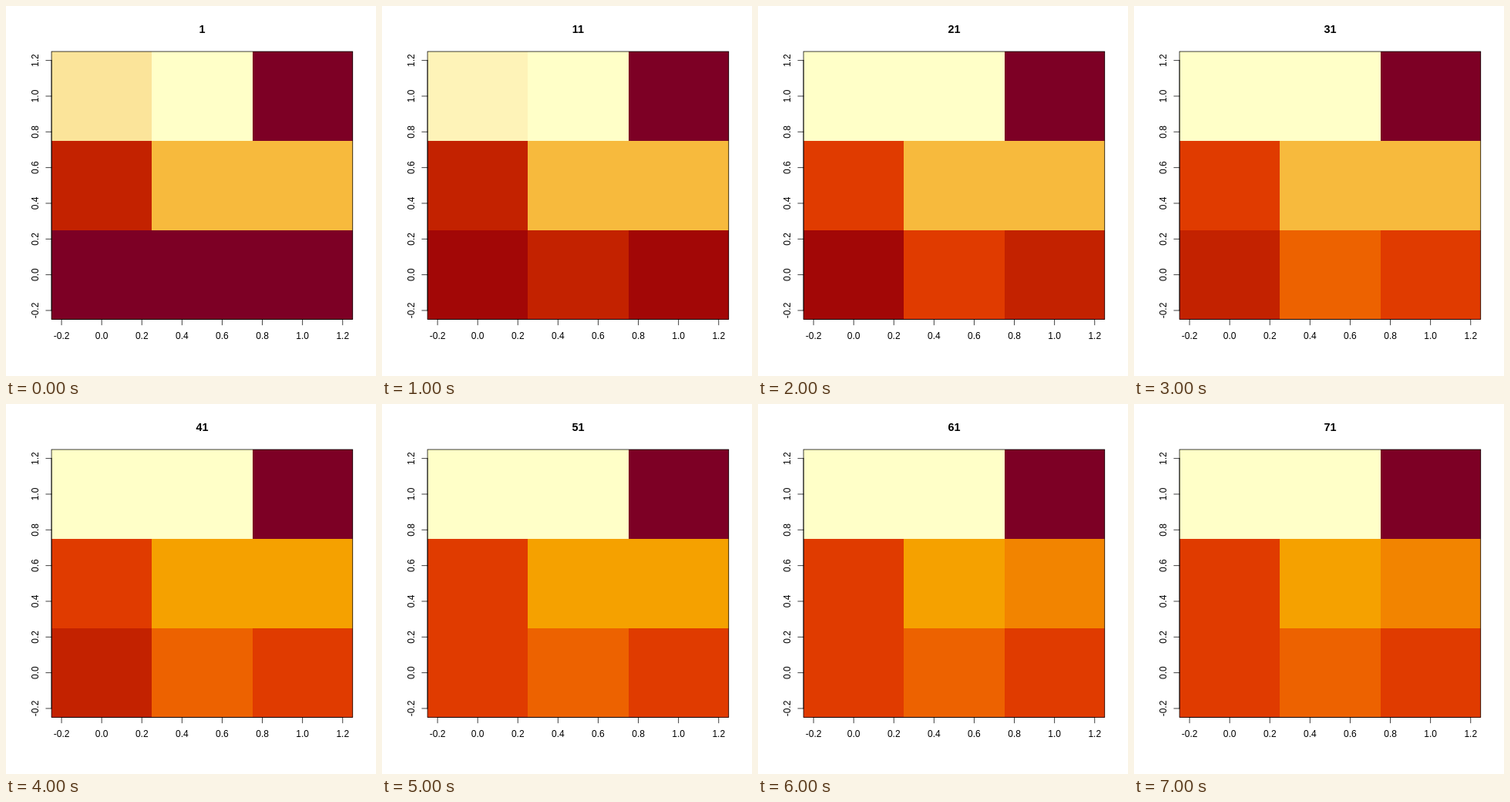
Animation of 480x480 px, one loop 8 s. Source, as an HTML page with a canvas:

```html
<!DOCTYPE html>
<html>
<head>
<meta charset="utf-8">
<style>
html, body { margin: 0; height: 100%; overflow: hidden; background: #fff; }
canvas { display: block; }
</style>
</head>
<body>
<canvas width="480" height="480"></canvas>
<script>
const ctx = document.querySelector('canvas').getContext('2d');
const STEP = 1000;
const LEFT = 59.04, RIGHT = 449.76, TOP = 59.04, BOTTOM = 406.56;
const FONT = '"Liberation Sans", Arial, sans-serif';

// Light to dark; each grid lists palette indices (base 12) row by row from the top.
const PALETTE = ['#ffffc8', '#fef3b8', '#fbe49a', '#f9d06c', '#f7ba3d', '#f5a100',
  '#f28400', '#ed6200', '#e03b00', '#c32200', '#a20706', '#7d0025'];
const GRIDS = ['20b944bbb', '10b944a9a', '00b844a89', '00b844978',
  '00b855978', '00b855878', '00b856878', '00b856878'];
const COLS = [59, 189, 320, 450], ROWS = [59, 175, 291, 407];

const xAt = v => LEFT + (v + 0.25) / 1.5 * (RIGHT - LEFT);
const yAt = v => BOTTOM - (v + 0.25) / 1.5 * (BOTTOM - TOP);

function line(x1, y1, x2, y2) {
  ctx.beginPath();
  ctx.moveTo(x1, y1);
  ctx.lineTo(x2, y2);
  ctx.stroke();
}

function label(text, x, y, angle = 0) {
  ctx.save();
  ctx.translate(x, y);
  ctx.rotate(angle);
  ctx.fillText(text, 0, 0);
  ctx.restore();
}

function drawAxes() {
  ctx.lineWidth = 0.75;
  ctx.lineCap = 'round';
  ctx.strokeStyle = ctx.fillStyle = '#000';
  ctx.textAlign = 'center';
  ctx.font = '12px ' + FONT;
  line(xAt(-0.2), BOTTOM, xAt(1.2), BOTTOM);
  line(LEFT, yAt(-0.2), LEFT, yAt(1.2));
  for (let i = -1; i <= 6; i++) {
    const v = i / 5, text = v.toFixed(1);
    line(xAt(v), BOTTOM, xAt(v), BOTTOM + 7.2);
    line(LEFT, yAt(v), LEFT - 7.2, yAt(v));
    label(text, xAt(v), 432);
    label(text, 42, yAt(v), -Math.PI / 2);
  }
  ctx.strokeRect(LEFT, TOP, RIGHT - LEFT, BOTTOM - TOP);
}

function draw(index) {
  ctx.fillStyle = '#fff';
  ctx.fillRect(0, 0, 480, 480);
  [...GRIDS[index]].forEach((digit, i) => {
    const c = i % 3, r = Math.floor(i / 3);
    ctx.fillStyle = PALETTE[parseInt(digit, 12)];
    ctx.fillRect(COLS[c], ROWS[r], COLS[c + 1] - COLS[c], ROWS[r + 1] - ROWS[r]);
  });
  drawAxes();
  ctx.font = 'bold 14.4px ' + FONT;
  label(String(index * 10 + 1), (LEFT + RIGHT) / 2, 35);
}

function tick() {
  draw(Math.floor(performance.now() / STEP) % GRIDS.length);
  requestAnimationFrame(tick);
}
tick();
</script>
</body>
</html>
```
